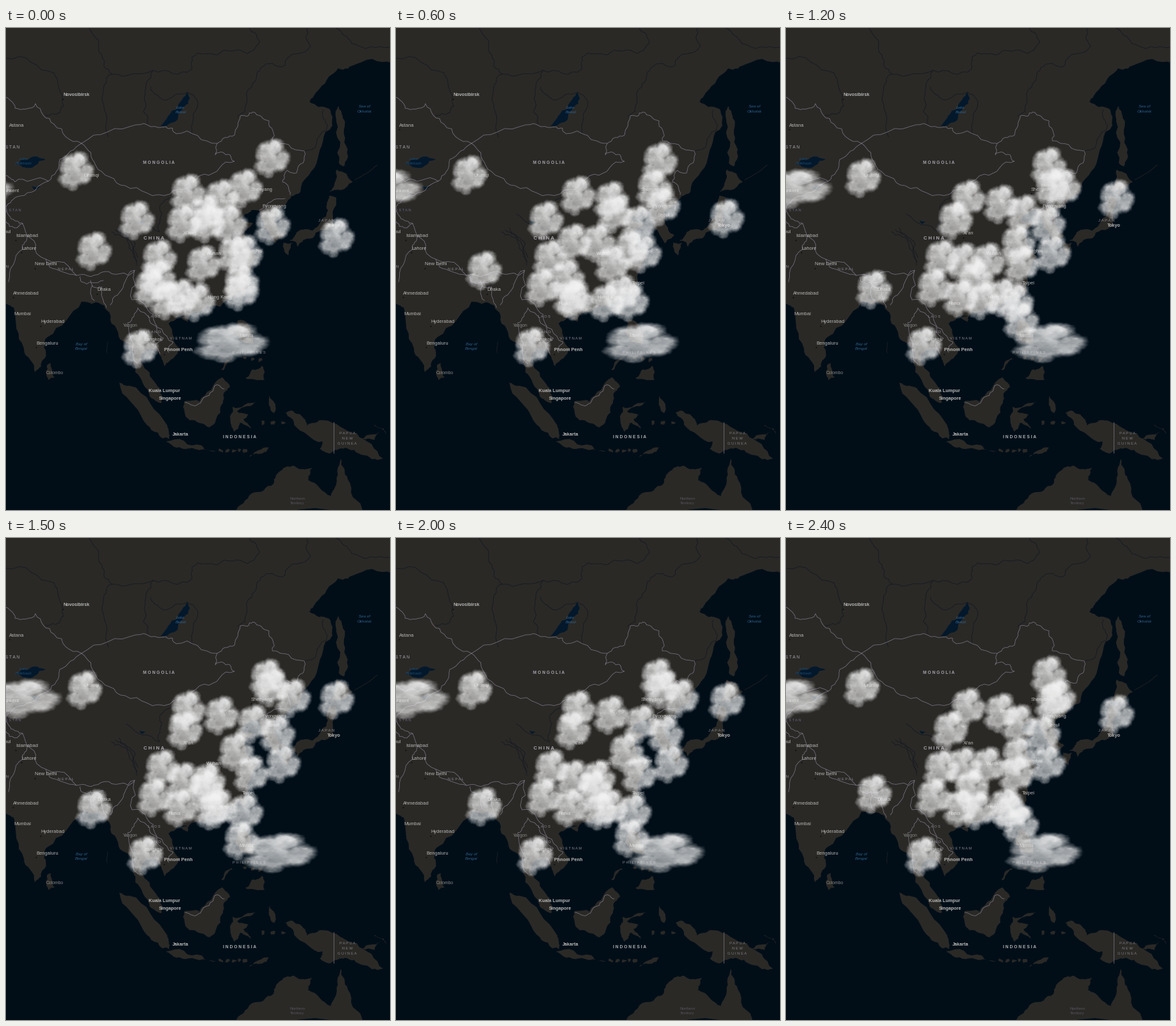
These frames come from a looping animation (600 by 752 pixels, 2.5 s). A matplotlib script:

```python
import numpy as np
import matplotlib.pyplot as plt
from matplotlib.animation import FuncAnimation

W, H, DPI = 600, 752, 64
PX = 72 / DPI
FRAMES, TURN = 25, 17.15
SEA, LAND, LAKE = "#010e18", "#2a2926", "#03182b"
BORDER, PROVINCE = "#77717c", "#171a22"
rng = np.random.default_rng(4)

fig = plt.figure(figsize=(W / DPI, H / DPI), dpi=DPI, facecolor=SEA)
ax = fig.add_axes([0, 0, 1, 1])
ax.set_xlim(0, W)
ax.set_ylim(H, 0)
ax.axis("off")


def rough(pts, amp, closed=False):
    """Roughen a path by midpoint displacement."""
    p = np.reshape(pts, (-1, 2)).astype(float)
    if closed:
        p = np.vstack([p, p[:1]])
    for _ in range(3):
        step = np.diff(p, axis=0)
        size = np.hypot(*step.T)[:, None]
        side = np.column_stack([-step[:, 1], step[:, 0]])
        side *= np.minimum(1, 30 / np.maximum(size, 1))
        mid = p[:-1] + step / 2 + side * rng.uniform(-amp, amp, (len(step), 1))
        out = np.empty((len(p) * 2 - 1, 2))
        out[::2], out[1::2] = p, mid
        p = out
    return p


def land(*pts, color=LAND):
    p = rough(pts, 0.16, True)
    ax.fill(p[:, 0], p[:, 1], color=color, lw=0)


def isles(x0, y0, x1, y1, n):
    """Scatter small islands between two points."""
    for t in np.linspace(0, 1, n):
        a = np.linspace(0, 2 * np.pi, 7)[:-1]
        r = rng.uniform(1, 4, 6)
        land(*np.column_stack([x0 + (x1 - x0) * t + 1.5 * r * np.cos(a),
                               y0 + (y1 - y0) * t + r * np.sin(a)]).ravel())


def line(*pts, color=BORDER, lw=0.8, amp=0.2):
    p = rough(pts, amp)
    ax.plot(p[:, 0], p[:, 1], color=color, lw=lw * PX, solid_joinstyle="round")


def river(*pts):
    line(*pts, color=PROVINCE, lw=0.9)


def label(x, y, text, size=7.5, color="#b4b4b2", ha="left", **kw):
    ax.text(x, y, text, size=size * PX, color=color, ha=ha, va="center",
            family="Liberation Sans", **kw)


def country(x, y, text, size=6.2, color="#85838a", ha="center", **kw):
    label(x, y, " ".join(text), size, color, ha, **kw)


def rows(x, y, *words, color="#2f618d", **kw):
    for k, word in enumerate(words):
        label(x, y + 7.5 * k, word, 6.2, color, "center", **kw)


# Siberia, Korea, China, Indochina, India
land(-9, -9, 612, -9, 612, 57, 548, 56, 519, 63, 485, 100, 474, 115, 505, 126,
     510, 152, 487, 204, 460, 256, 437, 275, 412, 289, 384, 284, 366, 300,
     -9, 310)
land(394, 282, 424, 278, 420, 302, 435, 324, 420, 336)
land(-9, 280, 366, 280, 366, 297, 386, 305, 371, 318, 392, 357, 377, 400,
     335, 435, 285, 449, 200, 412, -9, 412)
land(150, 398, 270, 398, 286, 448, 254, 461, 273, 500, 248, 528, 238, 505,
     219, 501, 210, 522, 235, 556, 243, 585, 224, 574, 202, 537, 201, 506,
     176, 481, 157, 440, 138, 427)
land(-9, 395, 165, 395, 150, 429, 118, 427, 65, 482, 60, 516, 45, 537,
     28, 500, 12, 436, -9, 428)

# Sri Lanka, Hainan, Taiwan
land(64, 526, 70, 523, 76, 545, 66, 549)
land(273, 452, 287, 447, 284, 459)
land(370, 398, 376, 400, 372, 418, 366, 411)
# Sakhalin and Japan
land(519, 122, 526, 140, 534, 190, 528, 216, 520, 211, 516, 146)
land(517, 221, 542, 240, 518, 252, 505, 257, 515, 238)
land(505, 262, 516, 264, 512, 310, 479, 328, 443, 332, 455, 318, 479, 316,
     503, 284)
land(433, 335, 447, 335, 441, 355)
land(452, 332, 465, 331, 456, 341)
# Indonesia
land(177, 553, 192, 558, 252, 620, 255, 641, 244, 640, 214, 611)
land(250, 645, 305, 651, 330, 660, 285, 656)
isles(336, 659, 374, 660, 5)
land(378, 670, 392, 660, 411, 655, 400, 664)
land(278, 583, 302, 583, 338, 545, 350, 560, 340, 570, 335, 600, 318, 623,
     287, 612)
land(354, 591, 392, 583, 361, 598, 379, 603, 371, 610, 383, 628, 366, 616,
     357, 630, 350, 607)
land(411, 574, 421, 588, 419, 601, 412, 590)
isles(402, 616, 432, 616, 3)
# Philippines
land(361, 457, 375, 458, 387, 493, 365, 485)
land(385, 533, 400, 527, 404, 549, 374, 546)
isles(374, 514, 397, 518, 3)
land(352, 515, 355, 517, 339, 534, 336, 533)
# New Guinea and Australia
land(437, 600, 460, 603, 470, 620, 496, 612, 548, 632, 589, 672, 556, 666,
     530, 655, 505, 664, 490, 656, 495, 645, 450, 619)
land(557, 641, 585, 630, 576, 643)
land(575, 619, 590, 625, 594, 633)
land(357, 756, 384, 726, 418, 711, 432, 689, 450, 683, 478, 686, 472, 705,
     508, 730, 516, 712, 523, 672, 534, 704, 558, 756)

# Lakes
land(284, 100, 285, 118, 268, 143, 241, 154, 269, 124, color=LAKE)
land(15, 212, 25, 205, 62, 205, 26, 217, color=LAKE)
land(40, 247, 53, 247, 46, 252, color=LAKE)
land(209, 300, 218, 303, 213, 306, color=LAKE)

# Provinces and rivers
river(0, 47, 75, 70, 88, 110, 84, 132, 62, 136)
river(130, 0, 150, 42, 166, 72, 150, 112, 160, 170)
river(166, 72, 230, 66, 216, 110, 222, 150)
river(226, 92, 245, 112, 284, 100, 300, 116, 290, 166)
river(230, 66, 290, 64, 291, 45, 330, 42, 378, 40, 396, 20, 380, 0)
river(470, 0, 476, 28, 436, 58, 398, 62, 384, 92, 362, 138)
river(515, 0, 540, 24, 600, 30)
river(465, 193, 500, 160, 496, 128)
for k in range(3):
    river(165 + 6 * k, 318 - 3 * k, 190 + 5 * k, 333, 204 + k, 370 - 6 * k)
river(188, 290, 240, 318, 240, 280, 262, 262)

# National borders
line(0, 108, 14, 125, 46, 118, 75, 150, 118, 180)
line(118, 180, 203, 151, 250, 154, 266, 165, 330, 180, 357, 167, 366, 137,
     386, 131, 411, 145, 416, 176, 466, 192, 454, 226, 440, 222, 432, 240,
     444, 260)
line(118, 180, 140, 214, 186, 246, 256, 259, 310, 228, 357, 208, 350, 198,
     327, 198, 330, 180)
line(118, 180, 84, 205, 66, 239, 22, 262, 2, 276)
line(0, 230, 14, 240, 66, 239)
line(2, 276, 8, 298, 26, 305, 48, 352, 110, 386, 154, 380, 201, 378, 184, 400,
     163, 432)
line(62, 361, 68, 373, 110, 386)
line(116, 388, 118, 396, 152, 394)
line(132, 394, 138, 425)
line(134, 402, 150, 404, 157, 436)
line(34, 324, 26, 345, 4, 396)
line(26, 305, 14, 312, 0, 302)
line(201, 378, 197, 424, 230, 447, 261, 490, 254, 506)
line(206, 437, 190, 460, 206, 524)
line(206, 437, 224, 456, 246, 484, 234, 493, 241, 508)
line(396, 284, 436, 266)
line(280, 584, 304, 585, 326, 558, 341, 563)
line(512, 615, 512, 663, amp=0)
line(545, 237, 580, 214, color="#22231f", amp=0.05)
line(159, 490, 158, 507, color="#1b2026", amp=0.05)

# Labels
cities = [
    (5, 152, "Astana"), (15, 325, "Islamabad"), (24, 344, "Lahore"),
    (45, 369, "New Delhi"), (11, 414, "Ahmedabad"), (12, 446, "Mumbai"),
    (54, 459, "Hyderabad"), (47, 492, "Bengaluru"), (142, 409, "Dhaka"),
    (121, 231, "Urumqi"), (215, 487, "Bangkok"), (364, 481, "Manila"),
    (369, 399, "Taipei"), (315, 421, "Hong Kong"), (409, 292, "Seoul"),
    (400, 279, "Pyongyang"), (383, 252, "Shenyang"), (333, 270, "Beijing"),
    (277, 321, "Xi'an"), (313, 353, "Wuhan"), (370, 348, "Shanghai"),
    (253, 431, "Hanoi"),
]
majors = [
    (89, 105, "Novosibirsk"), (247, 503, "Phnom Penh"), (502, 309, "Tokyo"),
    (223, 566, "Kuala Lumpur"), (239, 579, "Singapore"), (260, 634, "Jakarta"),
]
for x, y, name in cities + majors:
    ax.plot(x, y + 5.5, "o", ms=2 * PX, color="#0b0d10", mew=0)
for c in cities:
    label(*c)
for c in majors:
    label(*c, size=7.2, weight="bold")
label(63, 538, "Colombo", 6.8, "#858583")
label(183, 464, "Yangon", 6.8, "#858583")
label(21, 255, "Tashkent", ha="right")
label(8, 318, "Kabul", ha="right")

country(239, 211, "MONGOLIA", 6.6, "#a3a1a8", weight="bold")
country(231, 329, "CHINA", 7.6, "#aaa8ae", weight="bold")
country(365, 638, "INDONESIA", 6.6, "#b0b0b0", weight="bold")
country(21, 186, "KAZAKHSTAN", 6.8, "#a09ea4", ha="right")
country(24, 284, "TAJIKISTAN", 5.8, "#66647a", ha="right")
country(4, 372, "PAKISTAN", ha="right")
country(164, -1, "RUSSIA", 7)
country(501, 300, "JAPAN")
country(93, 377, "NEPAL", 5.8)
country(232, 451, "LAOS", 5.8)
country(223, 475, "THAILAND", 6)
country(273, 485, "VIETNAM", 5.6)
country(380, 507, "PHILIPPINES", 5.8)
for k, word in enumerate(["PAPUA", "NEW", "GUINEA"]):
    country(533, 633 + 7.5 * k, word, 5.8, "#7c7b80")
rows(455, 734, "Northern", "Territory", color="#55555c")
rows(28, 204, "Lake", "Balkhash", color="#1f4a70", style="italic")
rows(273, 124, "Lake", "Baikal", style="italic")
rows(560, 123, "Sea of", "Okhotsk", style="italic")
rows(118, 493, "Bay of", "Bengal", style="italic")


# Clouds
PW, PH, PAD = 57, 60, 4


def noise(x, y, cell):
    """Smooth value noise sampled on the axes x and y."""
    grid = rng.random((int(np.ptp(y) / cell) + 3, int(np.ptp(x) / cell) + 3))
    gx, gy = (x - x[0]) / cell, (y - y[0]) / cell
    wide = np.array([np.interp(gx, np.arange(grid.shape[1]), r) for r in grid])
    return np.array([np.interp(gy, np.arange(len(grid)), c) for c in wide.T]).T


def puff():
    x = np.arange(-PAD, PW + PAD, 0.5)
    y = np.arange(-PAD, PH + PAD, 0.5)
    blobs = [(19, 19, 16), (32, 16, 16), (42, 30, 15), (14, 43, 14),
             (28, 37, 18), (17, 29, 14), (38, 39, 14), (22, 46, 13)]
    depth = np.max([r - np.hypot(x - cx, y[:, None] - cy)
                    for cx, cy, r in blobs], axis=0)
    n = sum(noise(x, y, c) * k
            for c, k in [(16, 0.38), (8, 0.3), (4, 0.2), (2, 0.12)]) - 0.5
    edge = np.clip((depth + 9 * n + 2) / 9, 0, 1)
    body = 0.84 - 0.2 * y[:, None] / PH + 0.5 * n
    img = np.full((len(y), len(x), 4), 0.955)
    img[..., 3] = edge * np.clip(body, 0, 0.95)
    return img


def group(vx, vy, *starts, stretch=1):
    return [(x, y, vx, vy, stretch) for x, y in starts]


clouds = (
    group(5, 0, (177, 269), (346, 219), (322, 275), (285, 259), (330, 321),
          (281, 338), (272, 397), (210, 360))
    + group(5, 0, (296, 460), (-103, 220), stretch=2.03)
    + group(0, 5, (110, 317), (250, 274), (288, 274), (340, 366))
    + group(0, -5, (489, 296), (389, 277))
    + group(0, 0.72, (257, 227), (309, 235))
    + group(0.3, 0, (212, 329), (200, 374))
    + group(0.88, 0.95, (82, 192))
    + group(0.53, -0.3, (182, 469))
    + group(-0.45, 1.05, (388, 172))
    + group(-0.95, -1.3, (346, 322))
    + group(-2.3, 0.75, (340, 380))
    + group(4.6, 0, (226, 394))
    + group(0, 0, (246, 390))
)
sprite = puff()
images = [ax.imshow(sprite, aspect="auto", interpolation="bilinear", zorder=10)
          for _ in clouds]
ax.set_xlim(0, W)
ax.set_ylim(H, 0)


def update(i):
    u = i if i <= TURN else 2 * TURN - i
    for im, (x, y, vx, vy, s) in zip(images, clouds):
        x, y = x + vx * u, y + vy * u
        im.set_extent((x - PAD * s, x + (PW + PAD) * s, y + PH + PAD, y - PAD))
    return images


anim = FuncAnimation(fig, update, frames=FRAMES, interval=100, blit=False)
plt.show()
```
